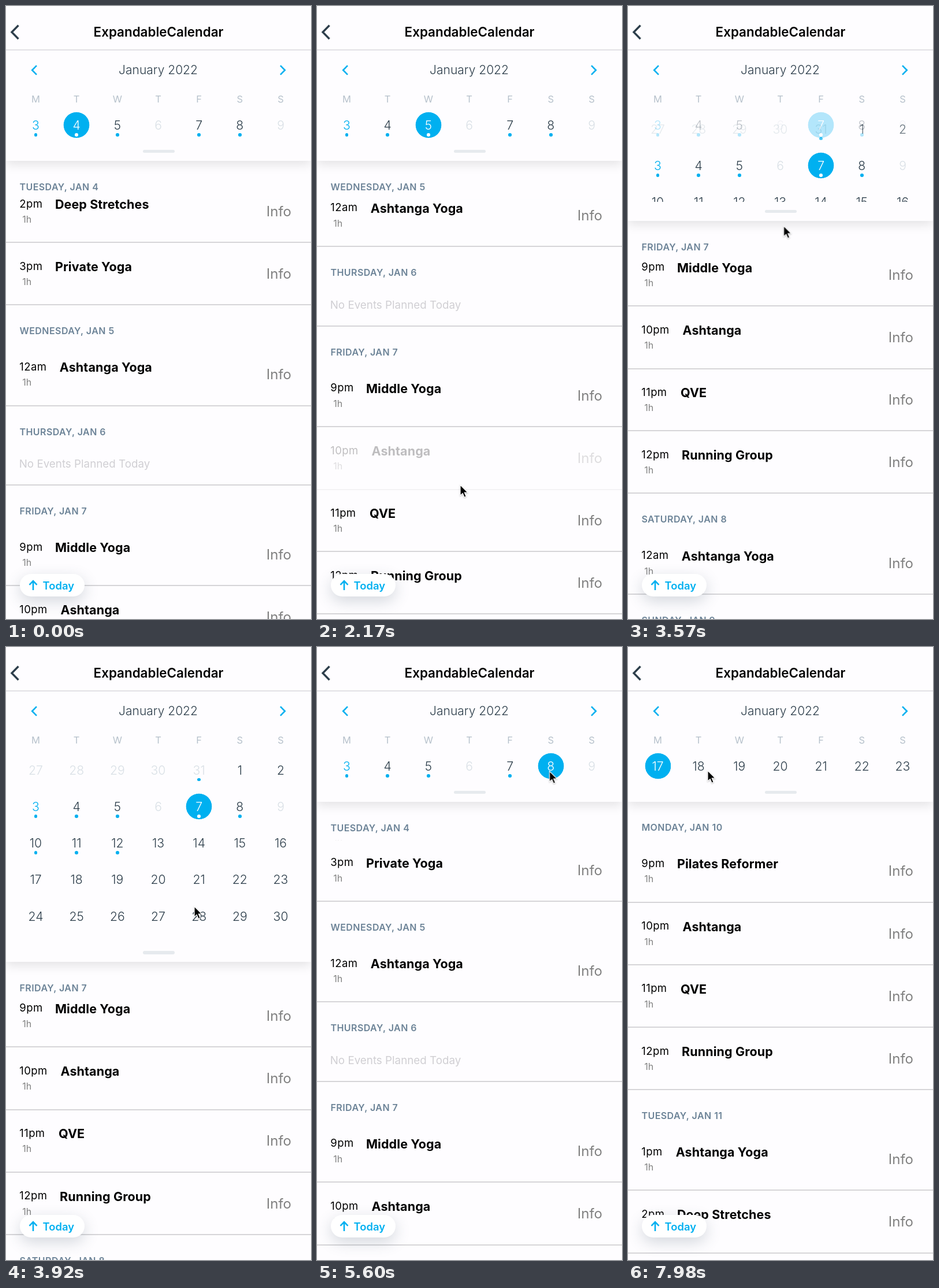
Write an HTML page that moves like this. It is 528x1061 px and loops after 8000 ms.

```html
<!DOCTYPE html>
<html lang="en">
<head>
<meta charset="utf-8">
<title>ExpandableCalendar</title>
<style>
  :root { --accent: #00b0f0; --ink: #2d3e4b; --paper: #fefdff; }
  html, body { margin: 0; width: 528px; height: 1061px; overflow: hidden; background: var(--paper); }
  body { position: relative; font-family: Inter, Roboto, "Noto Sans", sans-serif; }
  #stage { position: absolute; inset: 0; display: flex; flex-direction: column; overflow: hidden; }

  /* Zero line height centres the capitals on the given top. */
  .t { position: absolute; line-height: 0; white-space: nowrap; }
  .mid { transform: translateX(-50%); }
  svg { position: absolute; left: 0; top: 0; overflow: visible; fill: none; }

  #nav { position: relative; z-index: 3; flex: none; height: 77px; box-sizing: border-box;
    background: var(--paper); border-bottom: 2px solid #e2e1e5; }
  #nav .t { left: 264px; top: 45px; font-size: 22.4px; font-weight: 600; color: #000; }

  #panel { position: relative; z-index: 2; flex: none; height: 190.5px; background: var(--paper);
    box-shadow: 0 6px 18px rgba(0, 0, 0, .11); }
  #month { left: 263.5px; top: 34px; font-size: 21px; font-weight: 300; color: var(--ink); }
  .dow { top: 84px; font-size: 16.5px; color: #b6c1cb; }
  #clip { position: absolute; inset: 104px 0 33px; overflow: hidden; }
  #week { position: absolute; left: 0; top: 0; width: 528px; height: 54px; background: var(--paper); }
  #track { position: absolute; left: 0; top: 0; }
  #knob { position: absolute; left: 237px; bottom: 13.5px; width: 54.5px; height: 5.5px;
    border-radius: 3px; background: #e6eaee; }

  .cell { position: absolute; width: 44px; height: 44px; margin: -22px; line-height: 44px;
    text-align: center; font-size: 21.2px; font-weight: 300; color: var(--ink); }
  .cell.off { color: #d9e0e6; }
  .cell.today { color: var(--accent); }
  .disc { position: absolute; inset: 0; border-radius: 50%; background: var(--accent); color: #fff;
    box-shadow: 0 0 0 .3px var(--accent); opacity: 0; }
  .dot { position: absolute; left: 19.2px; top: 36.2px; width: 5.6px; height: 5.6px;
    border-radius: 50%; background: var(--accent); }
  .disc .dot { background: #fff; }

  #list { position: relative; flex: 1; min-height: 0; margin-top: 1px; overflow: hidden; }
  .head { position: sticky; top: 0; z-index: 1; height: 66.1px; background: var(--paper); }
  .head .t { left: 23.4px; top: 44px; font-size: 16px; font-weight: 600; letter-spacing: .45px; color: #6c8397; }
  .row { position: relative; height: 108.2px; box-sizing: border-box; border-bottom: 2px solid #d6d5d8; }
  .row.empty { height: 71.3px; }
  .time { left: 23.3px; top: 39.5px; font-size: 18.5px; letter-spacing: .4px; color: #000; }
  .span { left: 28.3px; top: 67px; font-size: 16px; color: #808080; }
  .name { top: 41px; font-size: 21.5px; font-weight: 700; letter-spacing: .1px; color: #000; }
  .info { left: 450.8px; top: 54px; font-size: 24px; color: #808080; }
  .none { left: 22.7px; top: 34.5px; font-size: 18.8px; color: #d0cfd3; }

  #today { position: absolute; z-index: 3; left: 23.5px; top: 983px; width: 112.5px; height: 39px;
    border-radius: 20px; background: #fff; box-shadow: 0 8px 26px rgba(60, 80, 100, .22); }
  #today .t { left: 40px; top: 19.5px; font-size: 18.4px; font-weight: 600; color: var(--accent); }
  #cursor { z-index: 4; width: 14px; height: 24px; opacity: 0; filter: drop-shadow(0 1px 1px rgba(0, 0, 0, .25)); }
</style>
</head>
<body>
<div id="stage">
  <div id="nav">
    <svg width="1" height="1"><path d="M21.5 33.5L10 45.3L21.5 57" stroke="#2d3e4b" stroke-width="3.4"/></svg>
    <div class="t mid">ExpandableCalendar</div>
  </div>
  <div id="panel">
    <svg width="1" height="1" stroke="#00b0f0" stroke-width="2.6">
      <path d="M53 26.2L45.2 34L53 41.8"/>
      <path id="next" d="M475 26.2L482.8 34L475 41.8"/>
    </svg>
    <div class="t mid" id="month">January 2022</div>
    <div id="clip">
      <div id="grid"></div>
      <div id="week"><div id="track"></div></div>
    </div>
    <div id="knob"></div>
  </div>
  <div id="list"><div id="content"></div></div>
  <div id="today">
    <svg width="1" height="1"><path d="M23 28V12.5M16.5 18.8L23 12.2L29.5 18.8" stroke="#00b0f0" stroke-width="2.6"/></svg>
    <div class="t">Today</div>
  </div>
  <svg id="cursor"><path d="M0 0V18.2L4.2 14.4L7.1 21.2L10.2 19.9L7.3 13.2H13Z" fill="#000" stroke="#fff" stroke-width="1.2"/></svg>
</div>
<script>
const LOOP = 8000;
const LIN = 'linear', IN = 'ease-in', OUT = 'cubic-bezier(.25,.5,.5,1)', SINE = 'cubic-bezier(.37,0,.63,1)';
const $ = id => document.getElementById(id);

// Each step is [ms, value, easing to the next step]; without easing the value holds.
function play(el, prop, steps) {
  const all = [[0, steps[0][1]], ...steps, [LOOP, steps.at(-1)[1]]];
  el.animate(all.map(([ms, value, easing = 'step-end']) => ({ offset: ms / LOOP, [prop]: value, easing })),
    { duration: LOOP, iterations: Infinity });
}
const px = steps => steps.map(([ms, v, ease]) => [ms, v + 'px', ease]);

function add(parent, cls, text = '', style = {}) {
  const el = document.createElement('div');
  el.className = cls;
  el.textContent = text;
  Object.assign(el.style, style);
  parent.append(el);
  return el;
}

// Calendar
const colX = col => 51.5 + 70.67 * col;
const marked = [0, 3, 4, 5, 7, 8, 10, 11, 12];

function press(el, down, up, low = .25) {
  play(el, 'opacity', [[down, 1, LIN], [down + 90, low], [up, low, LIN], [up + 90, 1]]);
}

function addDay(parent, n, x, y, spans) {
  const label = n < 1 ? n + 31 : n > 31 ? n - 31 : n;
  const off = n < 1 || n > 31 || n === 6 || n === 9;
  const cls = off ? ' off' : n === 3 ? ' today' : '';
  const cell = add(parent, 'cell' + cls, label, { left: x + 'px', top: y + 'px' });
  const dotted = marked.includes(n);
  if (dotted) add(cell, 'dot');
  if (spans) {
    const disc = add(cell, 'disc', label);
    if (dotted) add(disc, 'dot');
    const steps = spans.flatMap(([from, to]) => [[from, 1], [to, 0]]);
    play(disc, 'opacity', spans[0][0] ? [[0, 0], ...steps] : steps);
  }
  return cell;
}

[...'MTWTFSS'].forEach((d, i) => add($('panel'), 't mid dow', d, { left: colX(i) + 'px' }));

const monthPicks = { 4: [[4750, LOOP]], 7: [[0, 4750]] };
for (let i = 0; i < 42; i++) {
  const n = i - 4;
  const cell = addDay($('grid'), n, colX(i % 7), 31.5 + 63.3 * Math.floor(i / 7), monthPicks[n]);
  if (n === 4) press(cell, 4500, 4700);
}

const weekPicks = {
  4: [[0, 1610], [4750, 5520]], 5: [[1610, 2410]], 6: [[2410, 2540]], 7: [[2540, 4750]],
  8: [[5520, 6220]], 10: [[6220, 7330]], 17: [[7330, LOOP]]
};
for (let n = 3; n < 24; n++) {
  const i = n - 3;
  const cell = addDay($('track'), n, colX(i % 7) + 528 * Math.floor(i / 7), 25, weekPicks[n]);
  if (n === 16) press(cell, 6690, 6870);
}

// Agenda
const nameX = { '1pm': 82.7, '2pm': 84.9, '3pm': 84.9, '9pm': 84.9, '10pm': 94.5, '11pm': 91, '12pm': 93, '12am': 92.8 };
const evening = ['10pm Ashtanga', '11pm QVE', '12pm Running Group'];
const agenda = {
  'TUESDAY, JAN 4': ['2pm Deep Stretches', '3pm Private Yoga'],
  'WEDNESDAY, JAN 5': ['12am Ashtanga Yoga'],
  'THURSDAY, JAN 6': [],
  'FRIDAY, JAN 7': ['9pm Middle Yoga', ...evening],
  'SATURDAY, JAN 8': ['12am Ashtanga Yoga'],
  'SUNDAY, JAN 9': [],
  'MONDAY, JAN 10': ['9pm Pilates Reformer', ...evening],
  'TUESDAY, JAN 11': ['1pm Ashtanga Yoga', '2pm Deep Stretches', '3pm Private Yoga']
};
for (const [day, events] of Object.entries(agenda)) {
  const section = add($('content'), 'section');
  add(add(section, 'head'), 't', day);
  if (!events.length) add(add(section, 'row empty'), 't none', 'No Events Planned Today');
  for (const event of events) {
    const [time, ...words] = event.split(' ');
    const row = add(section, 'row');
    add(row, 't time', time);
    add(row, 't span', '1h');
    add(row, 't name', words.join(' '), { left: nameX[time] + 'px' });
    add(row, 't info', 'Info');
    if (day.startsWith('FRI') && time === '10pm') press(row, 2050, 2240);
  }
}

// Motion
play($('content'), 'marginTop', px([
  [0, -32.6], [1170, -32.6, OUT], [1820, -308.1], [2220, -308.1, SINE], [2590, -621.5],
  [4740, -621.5, SINE], [4970, 0], [5523, 0, SINE], [5900, -1093.1], [6200, -1093.1, OUT], [6370, -1404.8]
]));
play($('panel'), 'height', px([
  [3330, 190.5, IN], [3570, 294.6, LIN], [3760, 368, OUT], [4130, 507], [4740, 507, SINE], [4970, 190.5]
]));
play($('week'), 'opacity', [[3330, 1, IN], [3570, .3, LIN], [3680, 0], [4850, 0, LIN], [4970, 1]]);
play($('track'), 'transform', [
  [0, 0], [6220, -528], [6830, -528, SINE], [7120, -854, OUT], [7350, -1056]
].map(([ms, x, ease]) => [ms, `translateX(${x}px)`, ease]));
press($('next'), 6130, 6290, .3);

play($('cursor'), 'opacity', [[0, 0], [840, 1]]);
play($('cursor'), 'transform', [
  [0, 207, 730], [820, 207, 730, SINE], [1050, 210, 853], [1170, 210, 853, OUT], [1600, 213, 572],
  [1930, 213, 572, SINE], [2100, 248, 829], [2220, 248, 829, SINE], [2590, 251, 501],
  [2690, 251, 501, SINE], [3080, 264, 247], [3330, 264, 247, IN], [3570, 269, 380, OUT], [3780, 326, 449],
  [4160, 326, 449, SINE], [4600, 113, 278], [5070, 113, 278, SINE], [5500, 402.5, 215],
  [5640, 402.5, 215, SINE], [5900, 470, 143, OUT], [6090, 481, 108],
  [6460, 481, 108, SINE], [6650, 464, 203], [6830, 464, 203, SINE], [7120, 138, 214]
].map(([ms, x, y, ease]) => [ms, `translate(${x}px, ${y}px)`, ease]));
</script>
</body>
</html>
```
